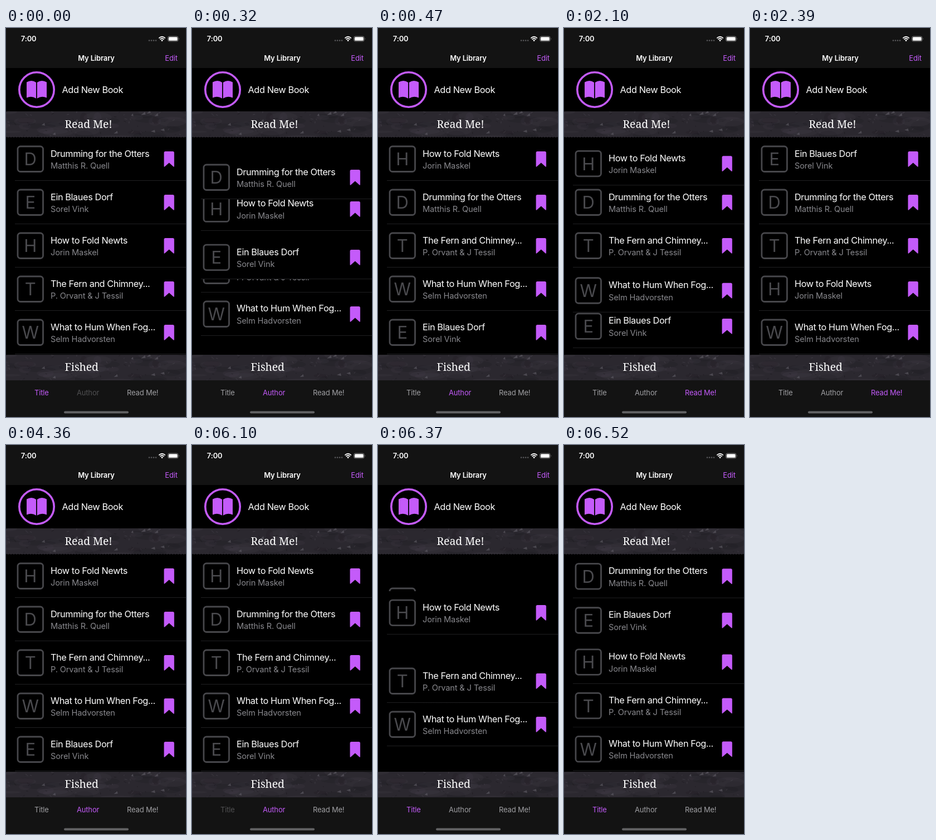
An HTML page for the animation above (6.56 s loop, 323 by 700 pixels).

```html
<!DOCTYPE html>
<html lang="en">
<head>
<meta charset="utf-8">
<title>My Library</title>
<style>
html, body { margin: 0; width: 100%; height: 100%; overflow: hidden; background: #000; }
svg { display: block; width: 100%; height: 100%; font-family: Inter, sans-serif; }
.title { font-size: 16.3px; letter-spacing: -.4px; fill: #fff; }
.author { font-size: 14.6px; letter-spacing: -.15px; fill: #88888d; }
.letter { font-size: 31px; text-anchor: middle; fill: #4a4a4e; }
.section { font: 300 19.4px "Noto Serif", serif; letter-spacing: -.1px; fill: #fff; }
.bar { font-size: 12.9px; letter-spacing: -.12px; }
</style>
</head>
<body>
<svg viewBox="0 0 323 700">
  <defs>
    <path id="mark" fill="#c45bfa" d="M283.500 27.500Q283.500 25 286 25H299.300Q301.800 25 301.800 27.500V51.500Q301.800 53.500 300.200 52.200L292.700 45.500L285.100 52.200Q283.500 53.500 283.500 51.500Z"/>
    <clipPath id="band"><rect width="323" height="47"/></clipPath>
    <g id="slate" clip-path="url(#band)"><rect width="323" height="47" fill="#2b282f"/></g>
  </defs>
  <rect width="323" height="700"/>
  <g id="rows"></g>

  <rect width="323" height="72" fill="#131313"/>
  <g fill="#fff">
    <text x="26.800" y="24" font-size="12.900" font-weight="600" letter-spacing="-.1">7:00</text>
    <g fill="#59595b">
      <circle cx="257" cy="22.500" r="1.300"/><circle cx="261" cy="22.500" r="1.300"/>
      <circle cx="265" cy="22.500" r="1.300"/><circle cx="269" cy="22.500" r="1.300"/>
    </g>
    <g fill="none" stroke="#fff" stroke-width="1.700">
      <path d="M274.300 18.300Q280 13.200 285.700 18.300M276.400 20.600Q280 17.400 283.600 20.600"/>
    </g>
    <path d="M278 22.200Q280 20.500 282 22.200L280 24.200Z"/>
    <rect x="290.500" y="15" width="18.500" height="9" rx="2.600" fill="none" stroke="#777"/>
    <rect x="291.800" y="16.300" width="15.900" height="6.400" rx="1.500"/>
    <path d="M310.300 18Q311.800 19.500 310.300 21Z" fill="#777"/>
    <text x="162" y="59.300" font-size="12.900" font-weight="600" text-anchor="middle" letter-spacing="-.12">My Library</text>
    <text class="bar" x="285.300" y="59.300" fill="#c45bfa">Edit</text>
  </g>

  <circle cx="55" cy="111" r="31.200" fill="none" stroke="#c45bfa" stroke-width="3.600"/>
  <path fill="#c45bfa" d="M54 98Q50 95 45.500 95Q41 95 37 97.500V125.500Q46 121.500 54 126.700ZM55.800 98Q60 95 64.500 95Q69 95 73 97.500V125.500Q64 121.500 55.800 126.700Z"/>
  <text class="title" x="100.500" y="117">Add New Book</text>

  <use href="#slate" y="150"/>
  <use href="#slate" y="588"/>
  <text class="section" x="105.500" y="179.700">Read Me!</text>
  <text class="section" x="105.500" y="616.700">Fished</text>

  <rect y="634" width="323" height="66" fill="#131313"/>
  <g id="tabs" class="bar">
    <text x="51" y="661">Title</text>
    <text x="127" y="661">Author</text>
    <text x="217" y="661">Read Me!</text>
  </g>
  <rect x="104" y="689.500" width="116" height="4" rx="2" fill="#636365"/>
</svg>
<script>
const LOOP = 6560, STEP = 48.3, LEAD = 40, MOVE = 300;
const TOP = 197, ROW = 78;
const books = [
  ["Drumming for the Otters", "Matthis R. Quell"],
  ["Ein Blaues Dorf", "Sorel Vink"],
  ["How to Fold Newts", "Jorin Maskel"],
  ["The Fern and Chimney...", "P. Orvant & J Tessil"],
  ["What to Hum When Fog...", "Selm Hadvorsten"]
];
// Book order, top to bottom, for each tab
const orders = [[0, 1, 2, 3, 4], [2, 0, 3, 4, 1], [1, 0, 3, 2, 4]];
const taps = [
  { press: 0, at: 180, from: 0, to: 1 },
  { press: 1890, at: 2100, from: 1, to: 2 },
  { press: 3870, at: 4060, from: 2, to: 1 },
  { press: 6100, at: 6270, from: 1, to: 0 }
];

function add(parent, tag, attrs, text = "") {
  const el = document.createElementNS("http://www.w3.org/2000/svg", tag);
  for (const key in attrs) el.setAttribute(key, attrs[key]);
  el.textContent = text;
  return parent.appendChild(el);
}

const list = document.getElementById("rows");
const tabs = [...document.getElementById("tabs").children];
const rows = books.map(([title, author]) => {
  const g = add(list, "g", {});
  add(g, "rect", { width: 323, height: ROW });
  add(g, "rect", { x: 16, y: 77, width: 307, height: 1, fill: "#202022" });
  add(g, "rect", { x: 21, y: 16, width: 45.5, height: 45.5, rx: 5, fill: "none", stroke: "#47474b", "stroke-width": 2.8 });
  add(g, "text", { class: "letter", x: 43.7, y: 50.3 }, title[0]);
  add(g, "text", { class: "title", x: 80, y: 34.5 }, title);
  add(g, "text", { class: "author", x: 80, y: 56 }, author);
  add(g, "use", { href: "#mark" });
  return g;
});

// Worn slate: soft smudges, fine scratches and a few pale chips
let seed = 11;
const rand = () => (seed = seed * 16807 % 2147483647) / 2147483647;
const slate = document.getElementById("slate");
for (let i = 0; i < 110; i++) {
  const x = rand() * 323, y = rand() * 47, light = rand() < .5;
  if (i < 40) add(slate, "ellipse", {
    cx: x, cy: y, rx: 6 + rand() * 24, ry: 2 + rand() * 8,
    fill: light ? "#4a4750" : "#16141a", opacity: .16
  });
  else if (i < 100) add(slate, "path", {
    d: `M${x} ${y}l${rand() * 10 - 5} ${rand() * 8 - 4}`,
    stroke: light ? "#5c5962" : "#121014", "stroke-width": .8, opacity: .5
  });
  else add(slate, "path", {
    d: `M${x} ${y}l${3 + rand() * 5} ${rand() * 5 - 7}l1 5z`, fill: "#5a575f", opacity: .7
  });
}
add(slate, "path", { d: "M0 46.500H323", stroke: "#0c0b0e", "stroke-dasharray": "3 2" });

// cubic-bezier(.42, 0, .58, 1)
function ease(x) {
  if (x >= 1) return 1;
  let lo = 0, hi = 1;
  for (let i = 0; i < 20; i++) {
    const s = (lo + hi) / 2, r = 1 - s;
    if (1.26 * s * r * r + 1.74 * s * s * r + s ** 3 < x) lo = s; else hi = s;
  }
  return lo * lo * (3 - 2 * lo);
}

let stacked = -1;
function render(t) {
  const tap = taps.findLast(p => t >= p.press);
  const done = t >= tap.at;
  const active = done ? tap.to : tap.from;
  const p = done ? ease((Math.floor((t - tap.at) / STEP) * STEP + LEAD) / MOVE) : 0;

  if (stacked !== active) {
    orders[active].forEach(i => list.append(rows[i]));
    stacked = active;
  }
  rows.forEach((row, i) => {
    const a = orders[tap.from].indexOf(i), b = orders[tap.to].indexOf(i);
    row.setAttribute("transform", `translate(0 ${TOP + ROW * (a + (b - a) * p)})`);
  });
  tabs.forEach((tab, i) => {
    const pressed = !done && i === tap.to;
    tab.setAttribute("fill", i === active ? "#c45bfa" : pressed ? "#505052" : "#a0a0a4");
  });
}

const start = performance.now();
function tick() {
  render((performance.now() - start) % LOOP);
  requestAnimationFrame(tick);
}
tick();
</script>
</body>
</html>
```
